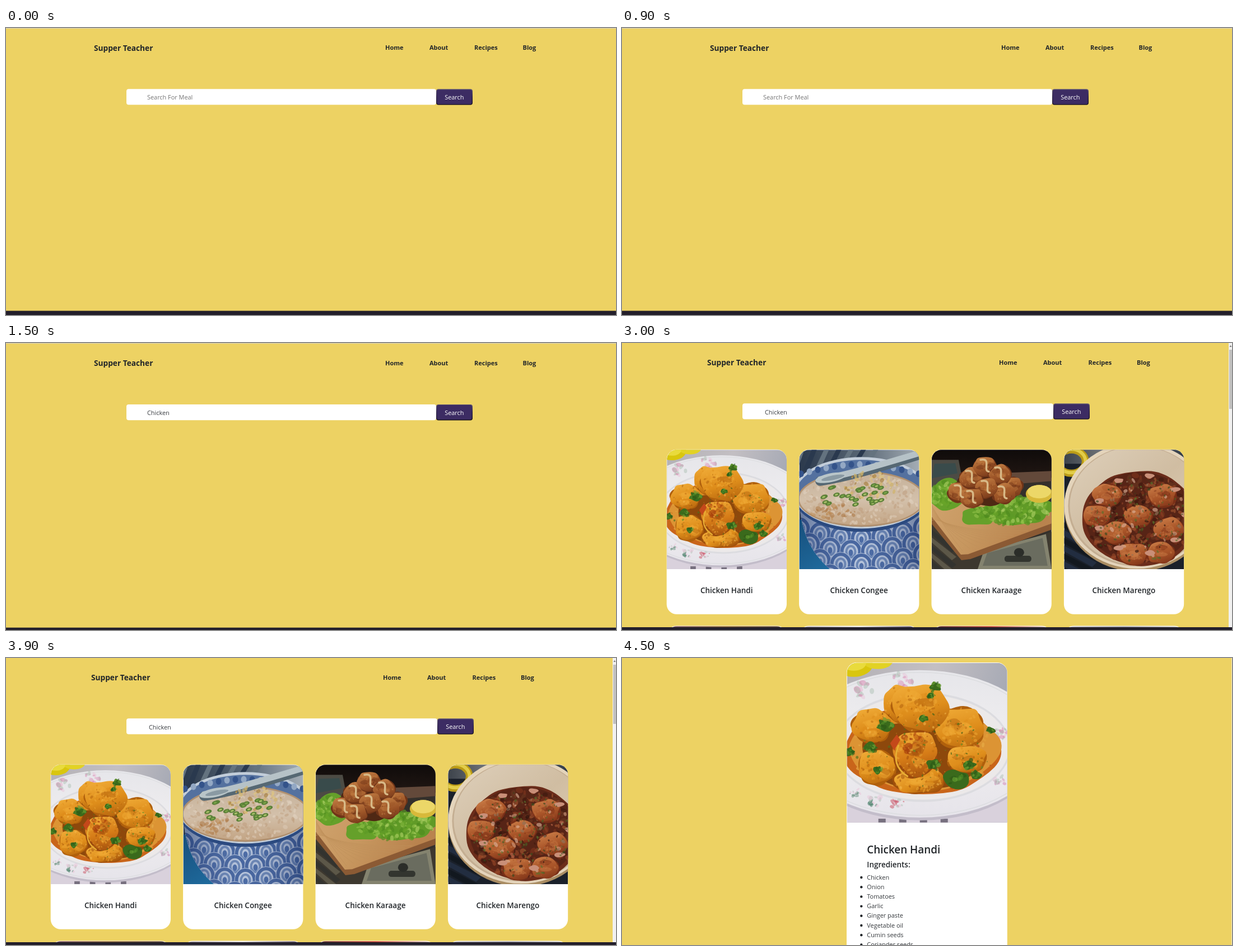
Recreate the animation shown at these times as an HTML page with a canvas. Size 1089 px wide and 514 px high, loop 6 s.

```html
<!DOCTYPE html>
<html lang="en">
<head>
<meta charset="utf-8">
<title>Meal search</title>
<style>
  html, body { margin: 0; width: 100%; height: 100%; overflow: hidden; background: #edd263; }
  canvas { display: block; }
</style>
</head>
<body>
<canvas id="stage" width="1089" height="514"></canvas>
<script>
const c = document.getElementById('stage').getContext('2d');
const TAU = Math.PI * 2;
const YELLOW = '#edd263', INK = '#212529', BAR = '#231f2b';
let seed = 1;

const rnd = () => (seed = seed * 16807 % 2147483647) / 2147483647;
const pick = list => list[Math.floor(rnd() * list.length)];

function rect(x, y, w, h, fill) {
  c.fillStyle = fill;
  c.fillRect(x, y, w, h);
}

function round(x, y, w, h, r, fill) {
  c.beginPath();
  c.roundRect(x, y, w, h, r);
  c.fillStyle = fill;
  c.fill();
}

function text(s, x, y, size, weight = 400, color = INK, align = 'left') {
  c.font = `${weight} ${size}px "Open Sans", "Noto Sans", sans-serif`;
  c.textAlign = align;
  c.fillStyle = color;
  c.fillText(s, x, y);
}

function oval(x, y, rx, ry, fill, rot = 0) {
  c.beginPath();
  c.ellipse(x, y, rx, ry, rot, 0, TAU);
  c.fillStyle = fill;
  c.fill();
}

function ring(x, y, rx, ry, color, width, from = 0, to = TAU) {
  c.beginPath();
  c.ellipse(x, y, rx, ry, 0, from, to);
  c.strokeStyle = color;
  c.lineWidth = width;
  c.stroke();
}

function poly(fill, ...pts) {
  c.beginPath();
  for (let i = 0; i < pts.length; i += 2) c.lineTo(pts[i], pts[i + 1]);
  c.closePath();
  c.fillStyle = fill;
  c.fill();
}

function curve(color, width, x, y, ...ctrl) {
  c.beginPath();
  c.moveTo(x, y);
  c.bezierCurveTo(...ctrl);
  c.lineCap = 'round';
  c.lineWidth = width;
  c.strokeStyle = color;
  c.stroke();
}

function fade(x0, y0, x1, y1, ...colors) {
  const g = c.createLinearGradient(x0, y0, x1, y1);
  colors.forEach((k, i) => g.addColorStop(i / (colors.length - 1), k));
  return g;
}

// Uneven rounded lump
function blob(x, y, rx, ry, fill, rough = 0.18, n = 14) {
  const pts = Array.from({ length: n }, (_, i) => {
    const a = i / n * TAU, k = 1 + (rnd() - 0.5) * 2 * rough;
    return [x + Math.cos(a) * rx * k, y + Math.sin(a) * ry * k];
  });
  c.beginPath();
  for (let i = 0; i <= n; i++) {
    const p = pts[i % n], q = pts[(i + 1) % n];
    const mx = (p[0] + q[0]) / 2, my = (p[1] + q[1]) / 2;
    i ? c.quadraticCurveTo(p[0], p[1], mx, my) : c.moveTo(mx, my);
  }
  c.fillStyle = fill;
  c.fill();
}

function specks(n, x, y, rx, ry, colors, size, alpha = 0.65) {
  c.globalAlpha = alpha;
  for (let i = 0; i < n; i++) {
    const a = rnd() * TAU, d = Math.sqrt(rnd()), s = size * (0.4 + rnd());
    oval(x + Math.cos(a) * rx * d, y + Math.sin(a) * ry * d, s, s * (0.4 + rnd() * 0.5), pick(colors), rnd() * 3);
  }
  c.globalAlpha = 1;
}

// Piece of meat: dark edge, lit body, folds and a mottled surface
function piece(x, y, rx, ry, dark, mid, light) {
  blob(x, y + ry * 0.05, rx * 1.03, ry * 1.03, dark, 0.12);
  blob(x, y, rx, ry, fade(x - rx * 0.3, y - ry, x + rx * 0.3, y + ry * 1.3, light, mid, dark), 0.16);
  c.globalAlpha = 0.45;
  for (let i = 0; i < 7; i++) {
    const a = rnd() * TAU, d = rnd() * 0.6;
    blob(x + Math.cos(a) * rx * d, y + Math.sin(a) * ry * d, rx * 0.35, ry * 0.25, pick([dark, mid, light, light]), 0.4, 9);
  }
  specks(rx, x, y, rx * 0.88, ry * 0.88, [dark, mid, light, light], rx * 0.07, 0.5);
}

function herb(x, y, r) {
  blob(x, y, r, r * 0.8, '#3a6a1c', 0.45, 11);
  specks(9, x, y, r * 0.9, r * 0.7, ['#6b9e34', '#4f8a26', '#2b5a16'], r * 0.3);
}

function flower(x, y, r, color) {
  specks(16, x, y, r, r * 0.7, [color, color, '#e9bfd4', '#a9bcb0'], r * 0.28, 0.45);
}

function curry() {
  rect(0, 0, 286, 286, fade(0, 0, 286, 100, '#b3b1b6', '#c3bfc3', '#a3a7b3'));
  rect(0, 150, 286, 136, '#d9d1dc');
  oval(12, 3, 34, 22, '#d9c60e');
  oval(55, -4, 27, 15, '#e2d224');
  oval(12, 1, 22, 13, '#e9db3c');
  for (let i = 0; i < 4; i++) rect(56 + i * 37, 279, 13, 7, '#77707f');
  oval(130, 149, 220, 133, '#c3bdca');
  oval(130, 145, 220, 132, fade(0, 13, 0, 277, '#e6e6ea', '#f0eef0', '#e6e4ea'));
  ring(130, 145, 215, 128, '#dcdde0', 1.5);
  oval(135, 151, 157, 98, '#dcdce0');
  oval(135, 151, 154, 94, '#ece9e9');
  flower(30, 48, 18, '#d778a8');
  flower(101, 30, 19, '#d783af');
  flower(277, 126, 14, '#d97aaa');
  flower(276, 211, 13, '#cf79b0');
  flower(90, 252, 13, '#c33c50');
  flower(50, 248, 14, '#39735c');
  flower(14, 232, 10, '#608a77');
  blob(134, 157, 141, 80, '#c9651a', 0.03, 24);
  blob(137, 153, 136, 76, '#dc9434', 0.04, 24);
  specks(170, 135, 158, 130, 74, ['#bd5a10', '#e2a03a', '#e8ae48', '#a8480c'], 4);
  blob(127, 166, 103, 66, '#8d480c', 0.1);
  const D = '#b0600c', M = '#de8d1b', L = '#efaa36';
  piece(45, 111, 36, 30, D, M, L);
  piece(202, 116, 42, 39, D, M, L);
  piece(52, 186, 34, 31, D, M, L);
  piece(214, 171, 36, 23, D, M, L);
  piece(128, 211, 48, 23, '#a0500a', M, L);
  piece(92, 72, 25, 33, D, M, L);
  piece(130, 79, 48, 42, D, M, L);
  piece(122, 161, 40, 42, '#9c4a0c', '#d57b17', L);
  specks(22, 115, 143, 20, 18, ['#b04a10', '#a63e0b', '#d8801c'], 5);
  specks(150, 130, 145, 100, 85, ['#7f4108', '#f4bb50', '#efa630', '#c06c10'], 2, 0.55);
  poly('#c4481a', 77, 144, 89, 128, 95, 138, 84, 157);
  curve('#e8ae34', 3, 92, 148, 82, 172, 88, 190, 108, 203);
  herb(156, 43, 12); herb(150, 58, 8); herb(68, 112, 15); herb(137, 99, 8);
  herb(43, 152, 11); herb(154, 182, 11); herb(195, 208, 18); herb(217, 181, 12);
  herb(257, 120, 8); herb(55, 192, 9); herb(3, 158, 10); herb(230, 200, 11);
  specks(60, 135, 160, 122, 72, ['#4d741c', '#5a8f25', '#3c6018'], 2);
}

function congee() {
  rect(0, 0, 214, 214, fade(0, 0, 214, 0, '#2b394c', '#566472', '#a4adb5'));
  for (let i = 0; i < 7; i++) poly(i % 2 ? '#2a394e' : '#64737f', i * 22, 0, i * 22 + 9, 0, i * 20 - 4, 38, i * 20 - 14, 38);
  rect(0, 125, 214, 89, fade(0, 125, 60, 214, '#174f7c', '#1f6c9f'));
  c.save();
  c.beginPath();
  c.moveTo(-2, 75);
  c.bezierCurveTo(2, 140, 14, 182, 62, 220);
  c.lineTo(216, 220);
  c.lineTo(216, 75);
  c.clip();
  rect(-2, 70, 218, 150, '#a9b9d2');
  // Scalloped pattern that follows the curve of the bowl
  for (let row = 0; row < 4; row++)
    for (let col = -1; col < 7; col++) {
      const x = col * 37 + (row % 2) * 18, y = 142 + row * 24 + Math.sin(x / 214 * Math.PI) * 17;
      oval(x, y, 20, 22, '#b9c6db');
      ring(x, y, 16, 18, '#3f5f9a', 6);
      ring(x, y, 8, 10, '#6783b2', 4);
      oval(x, y + 2, 4, 6, '#4465a0');
    }
  rect(0, 70, 214, 150, fade(0, 0, 214, 0, 'rgba(20,40,90,.45)', 'rgba(150,170,210,.1)', 'rgba(20,35,80,.35)'));
  c.restore();
  oval(111, 81, 122, 66, '#2b4a80');
  oval(111, 77, 121, 64, '#c2cdd9');
  oval(111, 78, 117, 60, '#54719f');
  for (let i = 0; i < 15; i++) oval(3 + i * 15, 43 - Math.sin(i / 14 * Math.PI) * 17, 5, 6, i % 2 ? '#93a8c4' : '#34538a');
  oval(111, 88, 114, 50, '#b0906f');
  oval(111, 88, 111, 47, fade(0, 45, 0, 135, '#c6b29b', '#d3c0aa', '#c3a585'));
  specks(260, 111, 89, 106, 44, ['#dccbb6', '#c5a889', '#e2d3c1', '#bf9f80'], 3.5, 0.55);
  specks(35, 60, 110, 45, 13, ['#a9733c', '#bb884e'], 4, 0.5);
  // Spoon
  curve('#566873', 17, 37, 56, 80, 50, 135, 34, 214, 9);
  curve('#b6c2c7', 11, 37, 53, 80, 46, 135, 30, 214, 6);
  oval(56, 50, 28, 8, '#b9c5c8', -0.2);
  oval(60, 50, 21, 4, '#8a9aa3', -0.2);
  specks(75, 125, 64, 50, 24, ['#d2b468', '#e0c680', '#a88040'], 3);
  for (let i = 0; i < 26; i++) {
    const x = 42 + rnd() * 112, y = 60 + rnd() * 38;
    oval(x, y, 6, 3.5, '#5b8038', -0.3);
    oval(x, y, 3, 1.6, pick(['#a7bf68', '#79a348']), -0.3);
  }
}

function karaage() {
  rect(0, 0, 214, 214, '#34302b');
  rect(0, 0, 214, 50, fade(0, 0, 0, 50, '#0f0b0a', '#211713'));
  poly('#4c4b44', 0, 18, 48, 18, 57, 66, 0, 82);
  poly('#394b4b', 5, 25, 42, 24, 46, 42, 0, 51);
  poly('#63493a', 140, 41, 214, 38, 214, 56, 140, 62);
  poly('#3d382f', 0, 130, 65, 197, 214, 147, 214, 214, 0, 214);
  for (let i = 0; i < 6; i++) poly(i % 2 ? '#5c5748' : '#33332f', 0, 143 + i * 14, 44, 178 + i * 14, 36, 184 + i * 14, 0, 152 + i * 14);
  poly('#84836f', 93, 181, 204, 151, 214, 214, 82, 214);
  poly('#6a6c5f', 99, 185, 198, 158, 207, 208, 91, 208);
  round(130, 190, 48, 11, 5, '#33352f');
  oval(156, 184, 9, 8, '#2b2d29');
  poly('#8b5a34', 0, 117, 0, 133, 53, 198, 69, 196, 214, 143, 214, 130);
  poly(fade(0, 95, 150, 190, '#cfa26d', '#c7975f', '#b9834e'), 0, 92, 62, 83, 214, 105, 214, 132, 65, 187, 52, 188, 0, 120);
  for (let i = 0; i < 10; i++) curve('#bf915b', 0.8, 0, 100 + i * 3, 10, 118, 30, 150, 55 + i * 13, 181 - i * 4);
  const greens = ['#4f8a1e', '#69a529', '#8fbf48', '#a8cc60', '#5c9a26'];
  blob(26, 80, 32, 26, '#65a02a', 0.25);
  blob(84, 118, 30, 18, '#65a02a', 0.25);
  blob(150, 107, 64, 27, '#609a27', 0.25, 20);
  specks(75, 26, 80, 28, 22, greens, 5);
  specks(190, 142, 108, 70, 25, greens, 5);
  oval(192, 79, 24, 16, '#d8b93a');
  oval(192, 75, 21, 12, '#ecd768');
  blob(98, 66, 58, 36, '#4f2814', 0.12);
  const mound = [[142, 66], [50, 76], [70, 50], [96, 30], [122, 44], [128, 78], [98, 68], [72, 86]];
  for (const [x, y] of mound) piece(x, y, 21, 18, '#6f3418', '#9c5427', '#c07c42');
  for (const [x, y] of mound.slice(1)) {
    curve('#d8b987', 3.5, x - 9, y - 12, x + 12, y - 16, x - 6, y + 8, x + 6, y + 9);
  }
}

function stew() {
  rect(0, 0, 214, 214, '#1a202a');
  rect(0, 0, 214, 25, fade(0, 0, 214, 0, '#3d434b', '#8c8f92', '#303a46'));
  for (let i = 0; i < 8; i++) poly(i % 2 ? '#222d40' : '#12181f', 0, 130 + i * 14, 58, 160 + i * 14, 50, 168 + i * 14, 0, 140 + i * 14);
  ring(13, 21, 25, 21, '#bb9b17', 13);
  ring(13, 20, 25, 21, '#e2cd48', 6);
  oval(130, 104, 130, 114, '#a98c62');
  oval(130, 100, 130, 113, '#e4d4bb');
  oval(131, 101, 124, 108, '#c4ae92');
  oval(131, 100, 121, 106, fade(40, 0, 190, 190, '#dccdb7', '#d0bda2', '#e0cfb4'));
  blob(135, 123, 102, 86, '#6b2c1a', 0.03, 24);
  oval(135, 121, 97, 81, '#572416');
  specks(300, 135, 123, 96, 80, ['#7d331c', '#944425', '#40190f', '#683520', '#a0532f'], 5);
  const at = [[78, 80], [175, 82], [92, 148], [172, 184], [188, 141], [132, 118], [58, 118], [123, 186]];
  for (const [x, y] of at) piece(x, y, 26, 20, '#7a3017', '#a85428', '#c87a45');
  specks(35, 137, 118, 90, 74, ['#c99478', '#d8ab92', '#b8684a'], 4);
  for (let i = 0; i < 9; i++) {
    const a = i / 9 * TAU;
    blob(138 + Math.cos(a) * 80, 116 + Math.sin(a) * 70, 9, 5, '#c98f78', 0.25, 9);
  }
  specks(170, 134, 124, 91, 76, ['#4a5d24', '#58702b', '#34481c'], 2);
  specks(60, 134, 124, 88, 72, ['#2e140d', '#8f7258'], 3);
}

function photo(draw, x, y, size, unit, radius) {
  seed = 4711;
  c.save();
  c.beginPath();
  c.roundRect(x, y, size, size, [radius, radius, 0, 0]);
  c.clip();
  c.translate(x, y);
  c.scale(size / unit, size / unit);
  draw();
  c.restore();
}

function header(y, left, nav) {
  text('Supper Teacher', left, y + 5.3, 13.7, 700);
  ['Home', 'About', 'Recipes', 'Blog'].forEach((s, i) => text(s, nav[i], y + 3.8, 11, 700));
}

function search(y, edge, textX, value) {
  round(215, y, edge - 215, 28.3, 4, '#fff');
  text(value || 'Search For Meal', textX, y + 19.2, 10.9, 400, value ? '#3a3d42' : '#757575');
  round(edge, y, 65, 28.5, 4, fade(0, y, 0, y + 28.5, '#6b6379', '#2d2442', '#17111f'));
  round(edge + 1.1, y + 1.2, 62.6, 26, 3, '#3c2c63');
  text('Search', edge + 32.3, y + 18.7, 10.9, 400, '#fff', 'center');
}

function home(y, value, barTop) {
  rect(0, 0, 1089, 1, '#d9d2bd');
  header(y, 157, [677, 756, 836, 922.5]);
  search(y + 74, 768, 252, value);
  rect(0, barTop, 1089, 514 - barTop, BAR);
}

const MEALS = [['Handi', curry, 286], ['Congee', congee, 214], ['Karaage', karaage, 214], ['Marengo', stew, 214]];
const NEXT = [['#7b5365', '#86602b', '#655044'], ['#b8adb2', '#ece9e7', '#67586c'], ['#5d3029', '#c33a26', '#e6e2dc'], ['#cfcbd0', '#a6a4ae', '#dedbd5']];

function results() {
  header(35, 152, [673, 752, 832.5, 919]);
  search(108.3, 770, 255, 'Chicken');
  MEALS.forEach(([name, draw, unit], i) => {
    const x = 79.7 + i * 236.4;
    round(x, 190.7, 214.3, 295.1, 18, '#fff');
    photo(draw, x + 0.5, 191.3, 213.8, unit, 17.5);
    text('Chicken ' + name, x + 107, 447.7, 13.5, 600, INK, 'center');
    round(x, 506.5, 214.3, 40, 18, '#fff');
    round(x + 0.5, 507.3, 213.3, 40, 17.5, fade(x, 0, x + 214, 0, ...NEXT[i]));
  });
  rect(1083, 0, 6, 509, '#f1f1f1');
  rect(1084, 12, 5, 106, '#c1c1c1');
  poly('#777', 1084.5, 7, 1086.5, 4, 1088.5, 7);
  rect(0, 509, 1089, 5, BAR);
}

function detail() {
  round(401, 8, 286.8, 540, 18, '#fff');
  photo(curry, 401.7, 8.8, 286, 286, 17.5);
  text('Chicken Handi', 437.3, 350, 18.9, 600);
  text('Ingredients:', 437.3, 374.7, 13.45, 600);
  ['Chicken', 'Onion', 'Tomatoes', 'Garlic', 'Ginger paste', 'Vegetable oil', 'Cumin seeds', 'Coriander seeds'].forEach((s, i) => {
    const y = 396.6 + i * 17.2;
    oval(427.3, y - 3.6, 2.2, 2.2, INK);
    text(s, 437.3, y, 10.9, 400, '#34383c');
  });
  rect(1088, 0, 1, 514, '#f4e9bd');
}

const scenes = [() => home(35.2, '', 506.5), () => home(35.9, 'Chicken', 509.7), results, detail];
let shown = -1;

function tick() {
  const i = Math.floor(performance.now() % 6000 / 1500);
  if (i !== shown) {
    shown = i;
    rect(0, 0, 1089, 514, YELLOW);
    scenes[i]();
  }
  requestAnimationFrame(tick);
}
tick();
</script>
</body>
</html>
```
